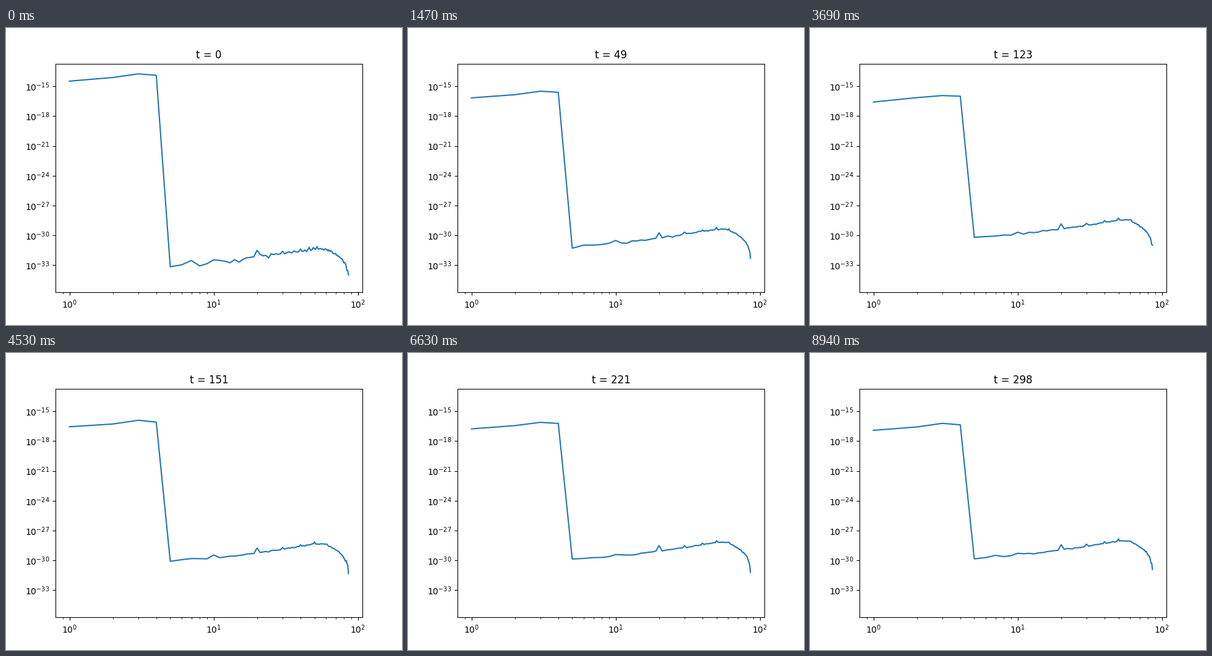
A matplotlib script for the animation above (8.97 s loop, 640 by 480 pixels).

```python
import numpy as np
import matplotlib.pyplot as plt
from matplotlib.animation import FuncAnimation
from matplotlib.ticker import NullLocator

FRAMES, STEP = 299, 30
TOP, BOTTOM = 57.6, 427.2        # axes edges in pixels
ZERO, DECADE = 94.25, 16.06      # pixel row of 1e-15, pixels per decade
BOX = 61                         # largest wave number along one axis

k = np.arange(1, 87)
forced = k < 5

# part of each circular shell that lies inside the square of modes
arc = 1 - 4 / np.pi * np.arccos(np.minimum(1, BOX / k))

# shapes in pixels, downwards
head = np.interp(k, [1, 2, 3, 4], [11.5, 5.7, 0, 2.6])
u = np.clip(np.log10(k / 5), 0, 1)
rise = -14 * u * (1 + u)
fall = 11 * (np.maximum(k - 50, 0) / 36) ** 3 - DECADE * np.log10(arc)
peaks = np.where(k == 20, 8, 3 * ((k % 10 == 0) & (k <= 50)))
tail = rise + fall - peaks

# seeded flicker, correlated over a few steps; small shells are noisier
rng = np.random.default_rng(7)
raw = rng.normal(size=(FRAMES, k.size))
noise = sum(np.roll(raw, s, axis=0) for s in range(3)) / np.sqrt(3)
spread = np.where(forced, 0.6, 2.4 / np.sqrt(k * arc))
unsettled = np.where(forced, 0, 1.5 * arc)


def energy(t):
    decay = 74.4 + DECADE * np.log10(1 + 0.956 * t)
    growth = 1 + 6.25 * t * t ** 4 / (t ** 4 + 62 ** 4)
    floor = 384.2 - DECADE * np.log10(growth)
    y = np.where(forced, decay + head, floor + tail)
    y = y + (spread + unsettled * np.exp(-t / 25)) * noise[t]
    return to_value(y)


def to_value(row):
    return 10 ** (-15 - (row - ZERO) / DECADE)


fig, ax = plt.subplots(figsize=(6.4, 4.8), dpi=100)
fig.subplots_adjust(left=.125, right=.9, bottom=.11, top=.88)
line, = ax.loglog(k, energy(0))
pad = 86 ** 0.05
ax.set_xlim(1 / pad, 86 * pad)
ax.set_ylim(to_value(BOTTOM), to_value(TOP))
ax.set_yticks([10.0 ** e for e in range(-33, -14, 3)])
ax.yaxis.set_minor_locator(NullLocator())
title = ax.set_title("t = 0", y=1.0)


def update(t):
    line.set_ydata(energy(t))
    title.set_text(f"t = {t}")
    return line, title


anim = FuncAnimation(fig, update, frames=FRAMES, interval=STEP,
                     repeat=True, repeat_delay=0)
plt.show()
```
